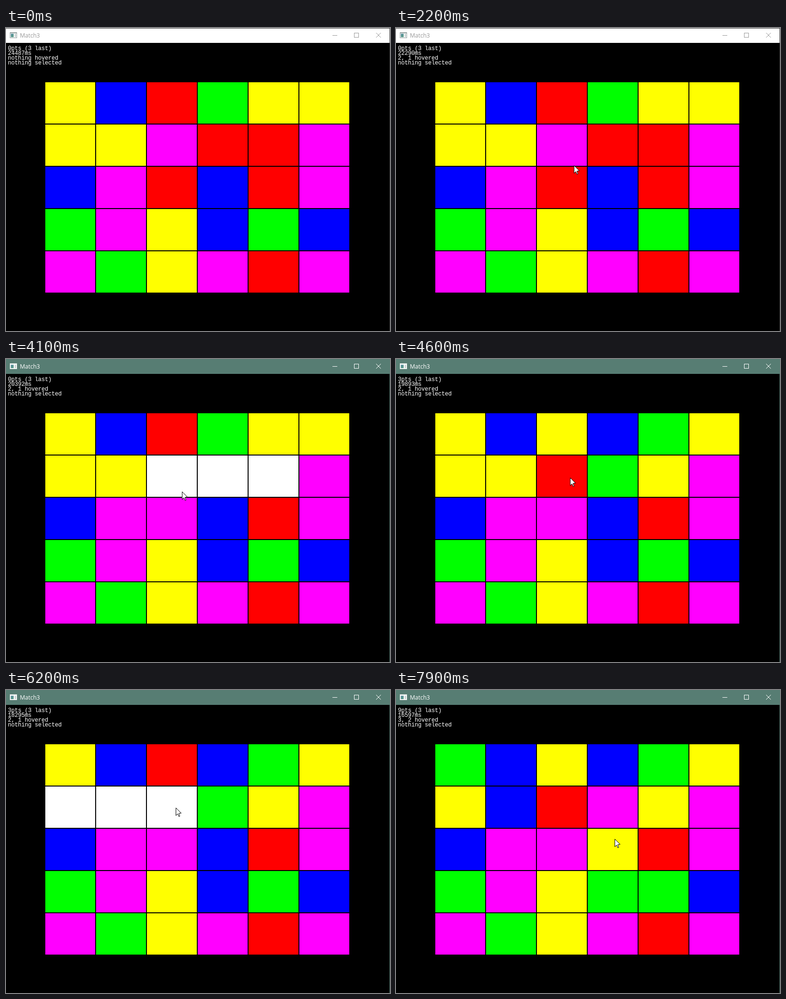
These frames come from a looping animation (801x631 px, 8000 ms). An HTML page with a canvas:

```html
<!DOCTYPE html>
<html lang="en">
<head>
<meta charset="utf-8">
<title>Match3</title>
<style>
html, body { margin: 0; width: 100%; height: 100%; overflow: hidden; background: #000; }
canvas { display: block; }
</style>
</head>
<body>
<canvas id="stage" width="801" height="631"></canvas>
<script>
const ctx = document.getElementById('stage').getContext('2d');
const LOOP = 8000, STEP = 100, CLEAR_MS = 600;
const COLS = 6, ROWS = 5;
const COLORS = { Y: '#ffff00', B: '#0000ff', R: '#ff0000', G: '#00ff00', M: '#ff00ff' };
const START = ['YBRGYY', 'YYMRRM', 'BMRBRM', 'GMYBGB', 'MGYMRM'];
const REFILL = 'YBGGBYYMB';
const CLICKS = [2900, 4000, 5200, 5700, 7000, 7200];

// Pointer stops: time, x, y
const STOPS = [
  [100, 292, 2], [900, 348, 292], [1500, 433, 350], [2200, 371, 286],
  [2900, 377, 233], [3500, 377, 233], [4000, 370, 305], [4200, 363, 247],
  [4600, 363, 247], [5200, 359, 167], [5700, 354, 245], [6300, 354, 245],
  [7000, 462, 172], [7100, 463, 220], [7800, 456, 310]
];

const ease = u => u * u * (3 - 2 * u);

function pointerAt(t) {
  const i = STOPS.findIndex(s => s[0] > t);
  if (i === 0) return null;
  if (i < 0) return STOPS[STOPS.length - 1].slice(1);
  const [t0, x0, y0] = STOPS[i - 1], [t1, x1, y1] = STOPS[i];
  const u = ease((t - t0) / (t1 - t0));
  return [Math.round(x0 + (x1 - x0) * u), Math.round(y0 + (y1 - y0) * u)];
}

function cellAt(point) {
  if (!point) return null;
  const c = Math.floor((point[0] - 81) / 106), r = Math.floor((point[1] - 112) / 88);
  return c >= 0 && c < COLS && r >= 0 && r < ROWS ? [c, r] : null;
}

// Cells in any run of three, column by column from the top.
function findMatches(board) {
  const same = (c, r, dc, dr) => [-2, -1, 0].some(from =>
    [0, 1, 2].every(n => {
      const col = board[c + (from + n) * dc];
      return col && col[r + (from + n) * dr] === board[c][r];
    }));
  const found = [];
  for (let c = 0; c < COLS; c++) {
    for (let r = 0; r < ROWS; r++) {
      if (same(c, r, 1, 0) || same(c, r, 0, 1)) found.push([c, r]);
    }
  }
  return found;
}

// Replays every click up to time t.
function play(t) {
  const board = Array.from({ length: COLS }, (_, c) => START.map(row => row[c]));
  let selected = null, score = 0, flashing = [];
  for (const at of CLICKS.filter(click => click <= t)) {
    const cell = cellAt(pointerAt(at));
    if (!selected) {
      selected = cell;
      continue;
    }
    const [a, b] = selected, [c, r] = cell;
    [board[a][b], board[c][r]] = [board[c][r], board[a][b]];
    selected = null;
    const matches = findMatches(board);
    if (t < at + CLEAR_MS) {
      flashing = matches;
    } else {
      for (const [mc, mr] of matches) {
        board[mc].splice(mr, 1);
        board[mc].unshift(REFILL[score++]);
      }
    }
  }
  return { board, selected, score, flashing };
}

function box(color, x, y, w, h) {
  ctx.fillStyle = color;
  ctx.fillRect(x, y, w, h);
}

function drawTitleBar(active) {
  const bar = active ? '#577d73' : '#ffffff';
  const edge = active ? '#577d73' : '#3c3c3c';
  const ink = active ? '#ffffff' : '#999999';
  box(bar, 0, 0, 801, 31);
  box(edge, 0, 0, 801, 1);
  box(edge, 800, 0, 1, 631);

  box(active ? '#e4eae8' : '#8c9a9a', 8, 9, 15, 12);
  box('#ffffff', 9, 11, 13, 9);
  const tint = ctx.createLinearGradient(10, 12, 15, 19);
  tint.addColorStop(0, '#5c8fa6');
  tint.addColorStop(1, '#559a80');
  box(tint, 10, 12, 6, 7);
  box('#c8d2d2', 18, 12, 3, 7);

  ctx.fillStyle = ink;
  ctx.font = '12px "Open Sans", sans-serif';
  ctx.fillText('Match3', 29, 20);

  box(ink, 681, 15, 10, 1);
  ctx.strokeStyle = ink;
  ctx.lineWidth = 1;
  ctx.strokeRect(726.5, 10.5, 9, 9);
  ctx.beginPath();
  ctx.moveTo(772, 10);
  ctx.lineTo(782, 20);
  ctx.moveTo(782, 10);
  ctx.lineTo(772, 20);
  ctx.stroke();
}

function drawStatus(lines) {
  ctx.fillStyle = '#ffffff';
  ctx.font = '12px "Liberation Mono", monospace';
  lines.forEach((line, row) => {
    [...line].forEach((ch, i) => ctx.fillText(ch, 4 + i * 7, 46 + row * 10));
  });
}

function drawBoard(board, flashing) {
  const tile = (color, c, r) => box(color, 82 + c * 106, 113 + r * 88, 104, 86);
  board.forEach((col, c) => col.forEach((key, r) => tile(COLORS[key], c, r)));
  flashing.forEach(([c, r]) => tile('#ffffff', c, r));
}

function drawPointer(x, y) {
  ctx.save();
  ctx.translate(x + 0.5, y + 0.5);
  ctx.beginPath();
  [[0, 0], [0, 16], [3.5, 12.5], [6, 18], [8, 17.5], [6, 11.5], [11, 11]]
    .forEach(([px, py]) => ctx.lineTo(px, py));
  ctx.closePath();
  ctx.fillStyle = '#ffffff';
  ctx.fill();
  ctx.strokeStyle = '#000000';
  ctx.lineWidth = 1;
  ctx.stroke();
  ctx.restore();
}

function draw(time) {
  const t = Math.floor((time % LOOP) / STEP) * STEP;
  const { board, selected, score, flashing } = play(t);
  const pointer = pointerAt(t);
  const label = cell => cell ? cell.join(', ') : 'nothing';

  box('#000000', 0, 0, 801, 631);
  drawTitleBar(t >= CLICKS[0]);
  drawStatus([
    `${score}pts (3 last)`,
    `${Math.round(24487 - t * 0.9987)}ms`,
    `${label(cellAt(pointer))} hovered`,
    `${label(selected)} selected`
  ]);
  drawBoard(board, flashing);
  if (pointer) drawPointer(...pointer);
}

const start = performance.now();
function tick() {
  draw(performance.now() - start);
  requestAnimationFrame(tick);
}
tick();
</script>
</body>
</html>
```
